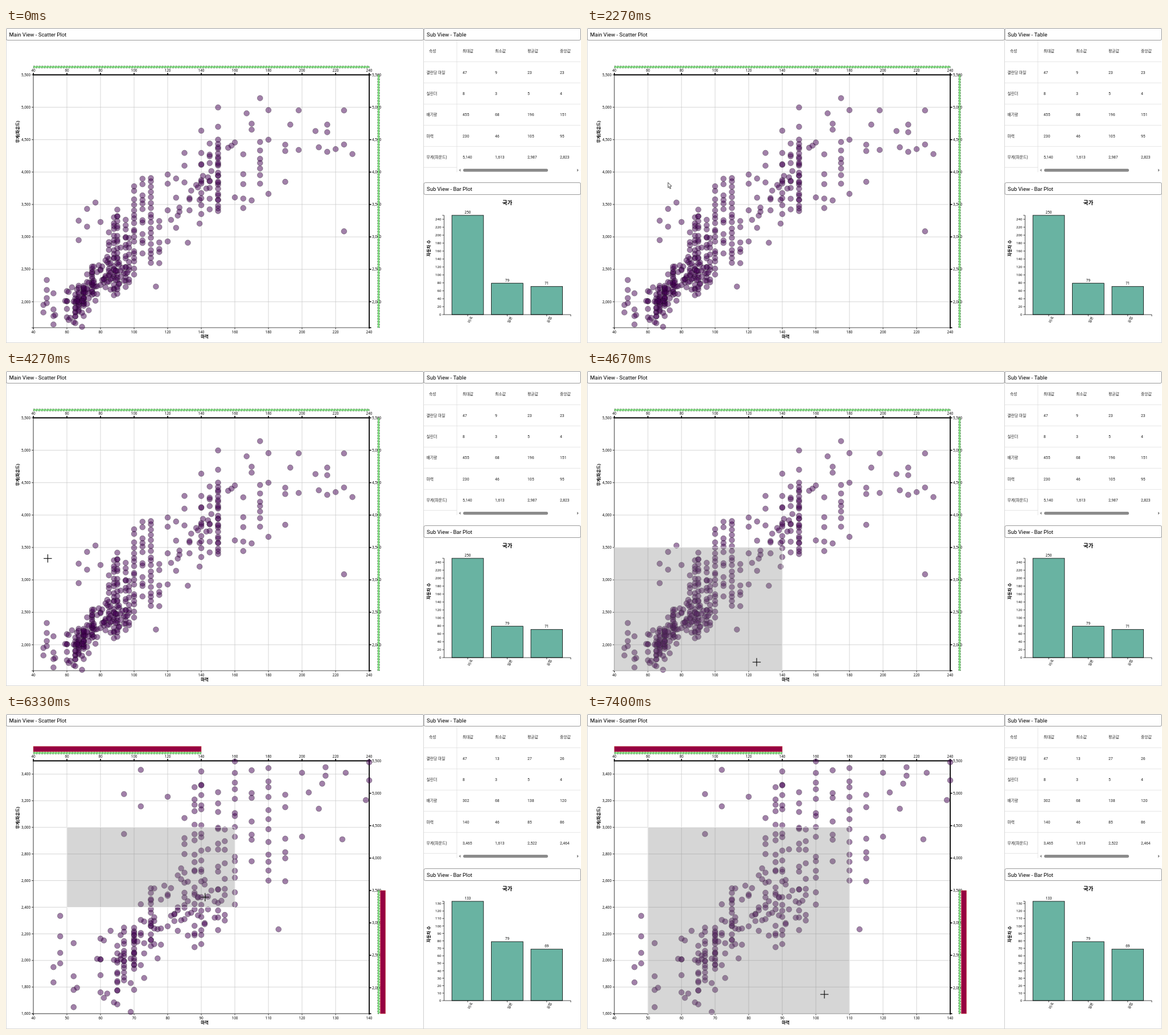
Write an HTML page with a canvas that moves like this. It is 1010 by 555 pixels and loops after 8000 ms.

```html
<!DOCTYPE html>
<html lang="ko">
<head>
<meta charset="utf-8">
<title>Scatter Plot Brushing</title>
<style>
  html, body { margin: 0; width: 100%; height: 100%; overflow: hidden; background: #fff; }
  canvas { display: block; width: 1010px; height: 555px; }
</style>
</head>
<body>
<canvas id="stage"></canvas>
<script>
const W = 1010, H = 555, LOOP = 8000, TICK = 200 / 3;
const UI = "Roboto, 'Noto Sans CJK KR', sans-serif";
const AXIS = "'Noto Sans', 'Noto Sans CJK KR', sans-serif";
const PLOT = { l: 48, r: 638, t: 82.5, b: 528 };

const canvas = document.getElementById('stage');
const ctx = canvas.getContext('2d');
const dpr = window.devicePixelRatio || 1;
canvas.width = W * dpr;
canvas.height = H * dpr;

const FULL = {
  x: [40, 240, 20], y: [1600, 5500, 500],
  stats: [[47, 9, 23, 23], [8, 3, 5, 4], [455, 68, 196, 151], [230, 46, 105, 95], [5140, 1613, 2987, 2823]],
  bars: [250, 79, 71], barStep: 20
};
const ZOOM = {
  x: [40, 140, 10], y: [1600, 3500, 200],
  stats: [[47, 13, 27, 26], [8, 3, 5, 4], [302, 68, 138, 120], [140, 46, 85, 86], [3465, 1613, 2522, 2464]],
  bars: [133, 79, 69], barStep: 10
};

// Isolated cars: horsepower, then weights
const STRAYS = [
  [46, 1835, 1950], [53, 1795], [67, 2950, 3250], [69, 1613], [72, 3158, 3432],
  [77, 3530], [80, 3230], [113, 2234], [120, 2930, 3410, 3820, 3962],
  [125, 3140, 3605, 3900], [130, 3840, 4098, 4295], [132, 2910], [133, 3410],
  [139, 3205, 3570], [140, 4638], [150, 4699, 4997], [160, 3609, 4456], [167, 4906],
  [170, 3563, 4654, 4746], [175, 5140], [180, 3664, 4499, 4955], [190, 3850, 4325, 4422],
  [193, 4732], [198, 4341, 4952], [208, 4633], [210, 4382], [215, 4312, 4615, 4732],
  [220, 4354], [225, 3086, 4425, 4951], [230, 4278]
];
// Crowded columns: horsepower, lowest weight, highest weight, count
const COLUMNS = [
  [48, 1978, 2335, 4], [52, 1649, 2130, 4], [60, 1760, 2164, 5], [65, 1773, 2110, 8],
  [67, 1850, 2145, 11], [70, 1937, 2245, 15], [75, 2108, 2542, 14], [85, 2310, 3070, 9],
  [88, 2100, 3302, 19], [90, 2123, 3420, 21], [95, 2228, 3264, 14], [97, 2300, 2984, 9],
  [100, 2420, 3781, 18], [105, 2745, 3897, 12], [110, 2600, 3907, 18], [115, 2595, 3245, 6],
  [140, 3353, 4294, 9], [145, 3425, 4440, 9], [150, 3399, 4500, 24], [165, 3445, 4274, 5],
  [175, 3821, 4464, 7]
];

// Pointer: time, x, y
const PATH = [
  [333, 1003, 542], [600, 640, 330], [867, 330, 140], [1000, 240, 114], [1133, 170, 174],
  [1467, 140, 298], [1600, 140, 298], [2000, 142, 272], [2267, 142, 272], [3067, 106, 257],
  [3133, 112, 260], [3333, 112, 260], [4000, 74, 352], [4200, 73, 332], [4267, 73, 330],
  [4667, 298, 513], [4867, 298, 513], [5467, 279, 458], [5733, 116, 203],
  [6667, 479, 389], [6733, 470, 432], [6800, 470, 432], [7400, 417, 494]
];

function seeded(seed) {
  return () => (seed = (seed * 1664525 + 1013904223) % 4294967296) / 4294967296;
}

function makeCars() {
  const rand = seeded(11), cars = [];
  for (const [hp, ...weights] of STRAYS) weights.forEach(w => cars.push([hp, w]));
  for (const [hp, lo, hi, n] of COLUMNS) {
    for (let i = 0; i < n; i++) {
      const shift = i && i < n - 1 ? (rand() - 0.5) * 1.3 : 0;
      cars.push([hp, lo + (hi - lo) * (i + shift) / (n - 1)]);
    }
  }
  const cloud = (n, from, to, base, slope, spread) => {
    for (let i = 0; i < n; i++) {
      const hp = Math.round(from + (to - from) * rand());
      cars.push([hp, base + slope * (hp - from) + (rand() + rand() - 1) * spread]);
    }
  };
  cloud(82, 58, 96, 1870, 19, 350);
  cloud(16, 112, 160, 2850, 34, 170);
  return cars;
}
const CARS = makeCars();

const scale = ([a, b], p, q) => v => p + (v - a) / (b - a) * (q - p);
const ticks = ([a, b, step]) => {
  const out = [];
  for (let v = Math.ceil(a / step) * step; v <= b; v += step) out.push(v);
  return out;
};
const fmt = v => v.toLocaleString('en-US');

function line(x1, y1, x2, y2, color = '#000', width = 0.7) {
  ctx.strokeStyle = color;
  ctx.lineWidth = width;
  ctx.beginPath();
  ctx.moveTo(x1, y1);
  ctx.lineTo(x2, y2);
  ctx.stroke();
}

// y is the middle of the digits
function label(str, x, y, size, { align = 'left', font = AXIS, weight = 400, turn = 0, color = '#000' } = {}) {
  ctx.save();
  ctx.translate(x, y);
  ctx.rotate(turn * Math.PI / 180);
  ctx.font = `${weight} ${size}px ${font}`;
  ctx.textAlign = align;
  ctx.fillStyle = color;
  ctx.fillText(str, 0, size * 0.36);
  ctx.restore();
}

function box(x, y, w, h, fill, stroke, width = 0.7, dash = []) {
  ctx.fillStyle = fill;
  ctx.fillRect(x, y, w, h);
  ctx.setLineDash(dash);
  ctx.strokeStyle = stroke;
  ctx.lineWidth = width;
  ctx.strokeRect(x, y, w, h);
  ctx.setLineDash([]);
}

function header(str, x, y, w) {
  ctx.beginPath();
  ctx.roundRect(x + 0.5, y + 0.5, w - 1, 21, 2.5);
  ctx.strokeStyle = '#808080';
  ctx.lineWidth = 0.8;
  ctx.stroke();
  label(str, x + 5.5, y + 11.5, 9.5, { font: UI });
}

function drawPanels() {
  ctx.strokeStyle = '#c8c8c8';
  ctx.lineWidth = 0.7;
  ctx.strokeRect(0.5, 20, 733, 534.5);
  ctx.strokeRect(733.5, 292, 276, 262.5);
  ctx.clearRect(1, 1, 732, 21);
  ctx.clearRect(734, 273, 275, 20);
  header('Main View - Scatter Plot', 0, 0, 734);
  header('Sub View - Table', 733.5, 0, 276.5);
  header('Sub View - Bar Plot', 733.5, 272, 276.5);
}

function drawTable(view) {
  const cols = [802, 859, 916, 973], rowY = i => 41 + i * 37.3;
  const names = ['갤런당 마일', '실린더', '배기량', '마력', '무게(파운드)'];
  const opt = { font: UI, color: '#222' };
  label('속성', 743, 41, 6.84, opt);
  ['최대값', '최소값', '평균값', '중앙값'].forEach((s, i) => label(s, cols[i], 41, 6.84, opt));
  names.forEach((name, r) => {
    label(name, 738.5, rowY(r + 1), 6.84, opt);
    view.stats[r].forEach((v, i) => label(fmt(v), cols[i], rowY(r + 1), 6.84, opt));
    line(734, rowY(r) + 18.5, 1009, rowY(r) + 18.5, '#dcdcdc');
  });
  line(734, 245.5, 792, 245.5, '#dcdcdc');
  line(792, 22, 792, 254, '#dcdcdc');
  ctx.fillStyle = '#8b8b8b';
  ctx.beginPath();
  ctx.roundRect(803, 248, 149, 5.2, 2.6);
  ctx.fill();
  for (const [x, d] of [[798.5, -3], [1003, 3]]) {
    ctx.beginPath();
    ctx.moveTo(x, 248);
    ctx.lineTo(x + d, 250.6);
    ctx.lineTo(x, 253.2);
    ctx.fill();
  }
}

function drawBars(view) {
  const y = scale([0, view.bars[0]], 505, 330);
  label('국가', 880.5, 308, 9.5, { align: 'center', weight: 700 });
  label('자동차 수', 742, 388, 7.4, { align: 'center', weight: 700, turn: -90 });
  view.bars.forEach((v, i) => {
    const mid = 811 + i * 69.4;
    box(mid - 27.8, y(v), 55.6, 505 - y(v), '#69b3a2', '#000', 0.8);
    label(fmt(v), mid, y(v) - 5.3, 6.3, { align: 'center' });
    line(mid, 505, mid, 508);
    label(['미국', '일본', '유럽'][i], mid + 4.5, 514, 6.3, { align: 'center', turn: -65 });
  });
  line(769.5, 330, 769.5, 505);
  line(766.3, 330, 769.5, 330);
  line(769.5, 505, 992, 505);
  line(992, 505, 992, 508);
  for (const v of ticks([0, view.bars[0], view.barStep])) {
    line(766.3, y(v), 769.5, y(v));
    label(fmt(v), 764.5, y(v), 6.1, { align: 'right' });
  }
}

function drawScatter(view, x, y) {
  const { l, r, t, b } = PLOT;
  const fx = scale(FULL.x, l, r), fy = scale(FULL.y, b, t);
  for (const v of ticks(view.x)) {
    line(x(v), t, x(v), b, '#c4c4c4');
    line(x(v), b, x(v), b + 3);
    label(fmt(v), x(v), b + 7.7, 6.3, { align: 'center' });
  }
  for (const v of ticks(view.y)) {
    line(l, y(v), r, y(v), '#c4c4c4');
    line(l - 3, y(v), l, y(v));
    label(fmt(v), l - 5, y(v), 6.3, { align: 'right' });
  }
  line(l - 3, b, r, b);
  line(l, t, l, b + 3);
  line(l - 1, t, r + 1, t, '#000', 1.8);
  line(r, t - 1, r, b + 1, '#000', 1.8);
  for (const v of ticks(FULL.x)) {
    line(fx(v), t - 3.5, fx(v), t, '#000', 1.6);
    label(fmt(v), fx(v), t - 8, 6.3, { align: 'center' });
  }
  for (const v of ticks(FULL.y)) {
    line(r, fy(v), r + 3.5, fy(v), '#000', 1.6);
    label(fmt(v), r + 5, fy(v), 6.3);
  }
  line(r, b, r + 3.5, b, '#000', 1.6);
  label('마력', 349, 543.5, 7.4, { align: 'center', weight: 700 });
  label('무게(파운드)', 20, 183, 7.4, { align: 'center', weight: 700, turn: -90 });

  // Range strips
  const right = fx(view.x[1]), top = fy(view.y[1]);
  box(l, 67.2, right - l, 3, '#8fee8f', '#244d24', 0.8, [3, 1.8]);
  box(653, top, 3, b - top, '#8fee8f', '#244d24', 0.8, [3, 1.8]);
  if (view === ZOOM) {
    box(l, 57, right - l, 9.3, '#960042', '#d9604f', 0.6);
    box(657.3, top, 9.3, b - top, '#960042', '#d9604f', 0.6);
  }

  ctx.globalAlpha = 0.5;
  ctx.fillStyle = '#440154';
  ctx.strokeStyle = '#000';
  ctx.lineWidth = 0.55;
  for (const [hp, w] of CARS) {
    if (hp > view.x[1] || w > view.y[1]) continue;
    ctx.beginPath();
    ctx.arc(x(hp), y(w), 4.9, 0, Math.PI * 2);
    ctx.fill();
    ctx.stroke();
  }
  ctx.globalAlpha = 1;
}

// The selection grows outward to whole grid cells
function drawBrush(view, x, y, from, to) {
  const snap = (px, py) => {
    const hp = view.x[0] + (px - PLOT.l) / (PLOT.r - PLOT.l) * (view.x[1] - view.x[0]);
    const w = view.y[0] + (PLOT.b - py) / (PLOT.b - PLOT.t) * (view.y[1] - view.y[0]);
    return [hp / view.x[2], w / view.y[2]];
  };
  const clamp = (v, [a, b]) => Math.max(a, Math.min(b, v));
  const [h0, w0] = snap(...from), [h1, w1] = snap(...to);
  const x0 = x(clamp(Math.floor(h0) * view.x[2], view.x));
  const x1 = x(clamp(Math.ceil(h1) * view.x[2], view.x));
  const y0 = y(clamp(Math.ceil(w0) * view.y[2], view.y));
  const y1 = y(clamp(Math.floor(w1) * view.y[2], view.y));
  box(x0, y0, x1 - x0, y1 - y0, 'rgba(119,119,119,0.3)', '#fff', 0.8);
}

function pointerAt(t) {
  const i = PATH.findIndex(k => k[0] > t);
  if (i < 0) return PATH[PATH.length - 1].slice(1);
  if (i === 0) return null;
  const [t0, x0, y0] = PATH[i - 1], [t1, x1, y1] = PATH[i];
  const k = (t - t0) / (t1 - t0);
  return [x0 + (x1 - x0) * k, y0 + (y1 - y0) * k];
}

function drawPointer([x, y], cross) {
  if (cross) {
    line(x - 7.2, y, x + 7.2, y, '#000', 1.1);
    line(x, y - 7.2, x, y + 7.2, '#000', 1.1);
    return;
  }
  const arrow = [[0.3, 0.2], [0.3, 9.4], [2.3, 7.6], [3.7, 11.2], [5.3, 10.5], [3.8, 7], [6.7, 6.7]];
  ctx.beginPath();
  arrow.forEach(([dx, dy]) => ctx.lineTo(x + dx, y + dy));
  ctx.closePath();
  ctx.fillStyle = '#fff';
  ctx.fill();
  ctx.strokeStyle = '#000';
  ctx.lineWidth = 0.7;
  ctx.stroke();
}

function draw(ms) {
  const t = Math.floor((ms % LOOP + 4) / TICK) * TICK + 1;
  const view = t < 4930 ? FULL : ZOOM;
  const x = scale(view.x, PLOT.l, PLOT.r), y = scale(view.y, PLOT.b, PLOT.t);
  const pointer = pointerAt(t);

  ctx.setTransform(dpr, 0, 0, dpr, 0, 0);
  ctx.clearRect(0, 0, W, H);
  drawPanels();
  drawTable(view);
  drawBars(view);
  drawScatter(view, x, y);
  if (t > 4300 && t < 4930) drawBrush(view, x, y, [73, 330], pointer);
  if (t > 5790) drawBrush(view, x, y, [116, 203], pointer);
  if (pointer) drawPointer(pointer, (t > 3130 && t < 4930) || t > 5730);
}

let start;
function frame(now) {
  start ??= now;
  draw(now - start);
  requestAnimationFrame(frame);
}
requestAnimationFrame(frame);
</script>
</body>
</html>
```
